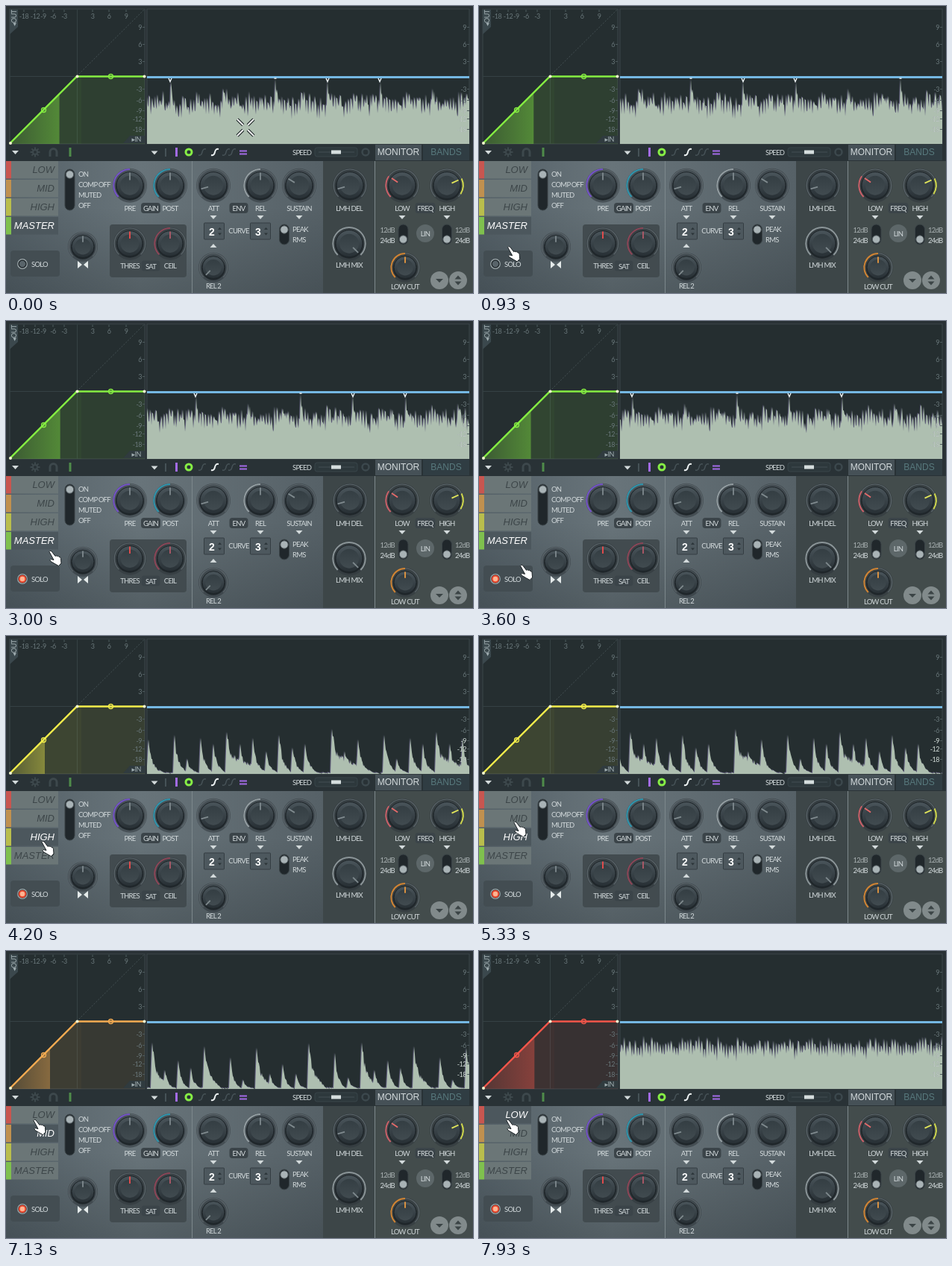
An HTML page that plays this animation: 626x385 px, repeating every 8 s.

```html
<!DOCTYPE html>
<html lang="en">
<head>
<meta charset="utf-8">
<title>Multiband compressor</title>
<style>
html, body { margin: 0; width: 100%; height: 100%; overflow: hidden; background: #293135; }
svg { display: block; width: 626px; height: 385px; }
text { font: 9.5px Lato, "Open Sans", sans-serif; letter-spacing: -.75px; fill: #d3dadc; }
.axis text { font-size: 9px; letter-spacing: -.5px; fill: #69777a; }
.tab, .band text { font: 12px "Liberation Sans", Arial, sans-serif; letter-spacing: 0; }
.band text { font-size: 13px; font-style: italic; fill: #3d4649; }
.band.on text { fill: #fff; }
.band.on .face { fill: #4c575d; }
.face { fill: #6b7677; }
.num { font: bold 14px "Liberation Sans", Arial, sans-serif; fill: #fff; }
</style>
</head>
<body>
<svg id="stage" viewBox="0 0 626 385" xmlns="http://www.w3.org/2000/svg"></svg>
<script>
const stage = document.getElementById('stage');
const $ = id => document.getElementById(id);

const rect = (x, y, w, h, fill, rx = 0, more = '') =>
  `<rect x="${x}" y="${y}" width="${w}" height="${h}" fill="${fill}" rx="${rx}" ${more}/>`;
const circle = (x, y, r, fill, more = '') => `<circle cx="${x}" cy="${y}" r="${r}" fill="${fill}" ${more}/>`;
const path = (d, stroke, width = 1, more = '') =>
  `<path d="${d}" fill="none" stroke="${stroke}" stroke-width="${width}" ${more}/>`;
const text = (x, y, s, anchor = 'middle', more = '') =>
  `<text x="${x}" y="${y}" text-anchor="${anchor}" ${more}>${s}</text>`;
const tri = (x, y, w, h, fill = '#d3dadb') => `<path d="M${x - w} ${y - h}h${2 * w}l${-w} ${2 * h}z" fill="${fill}"/>`;
const polar = (x, y, r, deg) => {
  const a = deg * Math.PI / 180;
  return `${(x + r * Math.sin(a)).toFixed(2)} ${(y - r * Math.cos(a)).toFixed(2)}`;
};
const arc = (x, y, r, from, to) =>
  `M${polar(x, y, r, from)}A${r} ${r} 0 ${to - from > 180 ? 1 : 0} 1 ${polar(x, y, r, to)}`;

// Angles are clockwise from the top.
function knob(x, y, r, angle, color, from, to, pointer = '#7f8a8e') {
  const cy = y + .7;
  return circle(x, cy, r + 5, '#30383c', 'opacity=".55"') +
    path(arc(x, cy, r + 3.7, -135, 135), '#5c666b', 1.2) +
    (color ? path(arc(x, cy, r + 3.7, from, to), color, 2) : '') +
    circle(x, cy + 1, r + 1, '#20272b') +
    circle(x, cy, r, 'url(#cap)', 'stroke="#1f262a"') +
    circle(x, cy, r * .72, 'url(#top)') +
    path(`M${polar(x, cy, r * .4, angle)}L${polar(x, cy, r * .95, angle)}`, pointer, 1.8);
}
const pill = (x, y, h, knobY) =>
  rect(x, y, 13, h, '#20272b', 6.5, 'stroke="#3a4347"') + circle(x + 6.5, knobY, 5.2, '#a9b3b6', 'stroke="#50595d"');
const tag = (x, y, w, s) => rect(x - w / 2, y - 7, w, 14, '#3b4449', 4) + text(x, y + 4, s);
const numberBox = (x, n) => rect(x, 291, 27, 22, '#4d585e', 1, 'stroke="#343d42"') +
  text(x + 10, 307.500, n, 'middle', 'class="num"') +
  tri(x + 21, 298.5, 2.5, -1.5, '#2c3539') + tri(x + 21, 306, 2.5, 1.5, '#2c3539');

const defs = `<defs>
  <linearGradient id="panel"><stop stop-color="#546067"/><stop offset=".42" stop-color="#68747a"/><stop offset="1" stop-color="#566167"/></linearGradient>
  <linearGradient id="shade" x2="0" y2="1"><stop offset=".35" stop-color="#20282c" stop-opacity="0"/><stop offset="1" stop-color="#20282c" stop-opacity=".28"/></linearGradient>
  <linearGradient id="cap" x2="0" y2="1"><stop stop-color="#4a555b"/><stop offset="1" stop-color="#272f34"/></linearGradient>
  <linearGradient id="top" x2="0" y2="1"><stop stop-color="#343e43"/><stop offset="1" stop-color="#414b50"/></linearGradient>
  <linearGradient id="glow"><stop stop-color="currentColor" stop-opacity=".12"/><stop offset="1" stop-color="currentColor" stop-opacity=".4"/></linearGradient>
  <clipPath id="under"><path d="M5 184L95 94H186V185H5z"/></clipPath>
  <clipPath id="scope"><path d="M189 5H621V185H189z"/></clipPath>
</defs>`;

const levels = [[9, 32], [6, 55], [3, 78], [-3, 115], [-6, 130], [-9, 144], [-12, 155], [-18, 169]];
const sideAxis = x => levels.map(([v, y]) =>
  text(x - 4, y, v, 'end') + path(`M${x - 3} ${y - 3.5}h3`, '#4d5a5d')).join('');
const topAxis = [[-18, 24], [-12, 39], [-9, 50], [-6, 63], [-3, 78], [3, 116], [6, 138], [9, 161]]
  .map(([v, x]) => text(x, 17, v) + path(`M${x} 5v3`, '#4d5a5d')).join('');

const curvePanel = rect(5, 4, 181, 181, '#252e30', 0, 'stroke="#3c474b"') +
  path('M95.5 5V185M5 94.5H186', '#354144') + path('M95 94L186 4', '#465255', 1, 'stroke-dasharray="2 2"') +
  `<g clip-path="url(#under)">${rect(5, 94, 181, 91, 'currentColor', 0, 'opacity=".085"')}
   ${rect(5, 94, 96, 91, 'currentColor', 0, 'opacity=".03"')}
   <rect id="level" x="5" y="94" height="91" fill="url(#glow)"/></g>
   ${path('M5 184.500L95 94.500H186', 'currentColor', 2.4)}
   ${circle(50.5, 139.5, 3, 'none', 'stroke="currentColor" stroke-width="1.3"')}
   ${circle(140.5, 94.5, 3, 'none', 'stroke="currentColor" stroke-width="1.3"')}` +
  [[6, 184], [95.5, 94.5], [185.5, 94.5]].map(([x, y]) => circle(x, y, 2, '#f1f6cf')).join('') +
  `<path d="M5 5h11v23l-11 10z" fill="#3b484d"/><path d="M157 184l9-10h20v10z" fill="#303b3f"/>
   <g class="axis">${topAxis}${sideAxis(186)}
   ${text(0, 0, '◂OUT', 'start', 'transform="translate(14 27) rotate(-90)" style="fill:#a3b0b3"')}
   ${text(181, 182, '▸IN', 'end', 'style="fill:#a3b0b3"')}</g>`;

const scopePanel = rect(189, 4, 432, 181, '#252e30', 0, 'stroke="#3c474b"') +
  `<g clip-path="url(#scope)"><path id="tint" fill="#8f82b8" opacity=".55" transform="translate(-1 -1)"/>
   <path id="wave" fill="#aebfb0"/>${rect(189, 94, 432, 3, '#74b7e2')}
   <path id="dips" fill="none" stroke="#eef4f5" stroke-width="1.4"/></g>
   <g class="axis">${sideAxis(621)}</g>
   <g class="axis" opacity=".75">${levels.slice(5).map(([v, y]) => text(617, y, v, 'end', 'style="fill:#e3eae3"')).join('')}</g>`;

const spokes = [0, 45, 90, 135].map(a => `M${polar(39, 196, 6.5, a)}L${polar(39, 196, 6.5, a + 180)}`).join('');
const wavy = (x, c, w = 1.5) => path(`M${x - 5} 200q4 1 5-4t5-4`, c, w);
const toolbar = rect(0, 186, 626, 22, '#293236') + tri(12.5, 196.5, 4.5, 2.5) +
  path(spokes, '#3d484c', 2) + circle(39, 196, 3, '#293236', 'stroke="#3d484c" stroke-width="2"') +
  path('M59 202v-6a4.5 4.5 0 0 1 9 0v6', '#3d484c', 3) + rect(84.5, 190, 3, 12, '#4f8b4a') +
  tri(199, 197, 4.5, 2.5) + rect(213, 191, 2, 11, '#465257') + rect(227, 190, 3, 12, '#a36be8') +
  circle(245, 196, 4, 'none', 'stroke="#86ee45" stroke-width="3"') + wavy(263, '#465257') +
  wavy(280, '#edf2f2', 2) + wavy(295, '#465257') + wavy(303, '#465257') +
  path('M313 194.500h10M313 198.500h10', '#a36be8', 2) +
  text(384, 200, 'SPEED', 'start', 'font-style="italic" font-weight="bold"') +
  rect(414, 190, 57, 12, '#2d383c', 3, 'stroke="#384449"') + path('M419 196h48', '#424f54') +
  rect(436, 193.500, 13, 5, '#d5dddd') + circle(482, 196, 4.5, 'none', 'stroke="#3c484d" stroke-width="2.5"') +
  rect(495, 186, 62, 21, '#465157') + rect(559, 186, 62, 21, '#303d43') +
  text(526, 200, 'MONITOR', 'middle', 'class="tab"') +
  text(590, 200, 'BANDS', 'middle', 'class="tab" style="fill:#58797d"');

const bandNames = ['LOW', 'MID', 'HIGH', 'MASTER'];
const chips = ['#c85650', '#c0904f', '#b9bd4c', '#7fc04e'];
const bands = bandNames.map((name, i) => {
  const y = 208 + 25 * i;
  return `<g class="band" id="${name}"><rect class="face" x="7" y="${y}" width="63" height="23.500"/>
    ${rect(0, y, 7, 23.500, chips[i])}${text(65, y + 16, name, 'end')}</g>`;
}).join('');

const controls = rect(0, 208, 425, 177, 'url(#panel)') + rect(0, 208, 425, 177, 'url(#shade)') +
  rect(425, 208, 69, 177, '#3d4648') + rect(495, 208, 131, 177, '#434c4c') +
  path('M249.500 208V385M494.500 208V385', '#7d888c') +
  rect(6, 328, 66, 35, '#434d52', 4) + rect(139, 293, 103, 71, '#424b4f', 4) + bands +
  pill(79, 219, 55, 226) + ['ON', 'COMP OFF', 'MUTED', 'OFF'].map((s, i) => text(97, 229 + 14 * i, s, 'start')).join('') +
  knob(166, 240, 18, 0, '#7452c8', -135, 0) + knob(220, 240, 18, 0, '#2f95ad', -135, 0) +
  knob(278, 240, 18, -106) + knob(341, 240, 18, 0, '#939da1', -135, 0) + knob(393, 240, 18, -58) +
  knob(461, 240, 18, -106) + knob(531, 240, 18, -55, '#c96068', -135, -55, '#e56a6a') +
  knob(591, 240, 18, 65, '#d0d84c', 65, 122, '#e4e85a') +
  knob(103, 322, 15, 0) + knob(166, 318, 17, 0, '', 0, 0, '#f04d4d') + knob(220, 318, 17, 0, '#8c4657', -135, 0, '#b35a69') +
  knob(460, 318, 18, 135, '#8b9598', -135, 135) + knob(278, 350, 15, -135) + knob(535, 350, 15, 0, '#cf8434', -135, 0, '#e99a40') +
  [['PRE', 166], ['POST', 220], ['ATT', 278], ['REL', 341], ['SUSTAIN', 393], ['LMH DEL', 460], ['LOW', 531], ['HIGH', 591]]
    .map(([s, x]) => text(x, 275, s)).join('') +
  tag(194, 271, 26, 'GAIN') + tag(312, 271, 25, 'ENV') + tag(562, 271, 27, 'FREQ') + tag(194, 348.500, 25, 'SAT') +
  [278, 341, 393, 531, 591].map(x => tri(x, 283.500, 4.5, 2.5)).join('') +
  text(166, 352, 'THRES') + text(220, 352, 'CEIL') + text(460, 351, 'LMH MIX') + text(278, 379, 'REL 2') + text(535, 380, 'LOW CUT') +
  '<path d="M96 342l6 5-6 5zM110 342l-6 5 6 5z" fill="#e4eaea"/>' +
  numberBox(265.500, 2) + numberBox(327.500, 3) + tri(278, 321.500, 4.5, -2.5) + text(312, 305, 'CURVE') +
  pill(366.500, 293, 27, 300) + text(384, 303, 'PEAK', 'start') + text(384, 317, 'RMS', 'start') +
  [[526, 521, 'end'], [584.500, 602, 'start']].map(([x, tx, a]) =>
    pill(x, 293, 27, 313) + text(tx, 304, '12dB', a, 'opacity=".7"') + text(tx, 318, '24dB', a)).join('') +
  circle(562, 305, 12, '#5d6769') + text(562, 309, 'LIN') +
  circle(581, 368, 12, '#818a8b') + tri(581, 368.500, 5, 2.5, '#3b4446') +
  circle(606, 368, 12, '#818a8b') + tri(606, 364, 4.5, -2.5, '#3b4446') + tri(606, 372, 4.5, 2.5, '#3b4446') +
  circle(22, 346, 6.3, '#22292d', 'stroke="#a0abae" stroke-width="1.2"') +
  circle(22, 346, 4.2, '#59646a', 'id="solo" stroke-width="2"') + text(34, 350, 'SOLO', 'start');

const darts = [45, 135, 225, 315].map(a => `M${polar(0, 0, 4.5, a)}L${polar(0, 0, 15.5, a)}`).join('');
const pointers = `<g id="cross">${path(darts, '#171f21', 4.2)}${path(darts, '#fff', 2)}</g>
  <path id="hand" fill="#fff" stroke="#1b2225" stroke-width="1" stroke-linejoin="round"
  d="M0 1.500Q1-.8 3 .8L8 7.500Q9 5.800 10.500 7.500Q12 6.300 13 8.500Q15 8 15.500 10.500L16 17L12.500 20.500L8 18L2 14.500Q0 12.500 2 11.500L6 12.500z"/>`;

stage.innerHTML = defs + rect(0, 0, 626, 385, '#293135') + curvePanel + scopePanel + toolbar + controls + pointers;

const BAR = 281, STEP = BAR / 16, SCROLL = 5.49;
const curveColors = { LOW: '#f4564a', MID: '#f4ac52', HIGH: '#f3ee4b', MASTER: '#86ef42' };
const mod = (a, n) => ((a % n) + n) % n;
const hash = n => { const s = Math.sin(n * 127.1) * 43758.5453; return s - Math.floor(s); };

// Peak height of each sixteenth note.
const hits = {
  HIGH: [56, 40, 48, 30, 52, 35, 40, 0, 60, 30, 46, 0, 52, 20, 48, 40],
  MID: [55, 20, 33, 20, 61, 0, 48, 15, 62, 25, 38, 28, 57, 0, 42, 12],
  MASTER: [87, 62, 68, 64, 84, 65, 68, 66, 83, 60, 70, 58, 74, 60, 70, 62]
};
// Share of the peak that rings on, and for how many pixels.
const tails = {
  HIGH: { heavy: [.45, 60], light: [.35, 18] },
  MID: { heavy: [.42, 24], light: [.25, 15] },
  MASTER: { heavy: [.3, 20], light: [.2, 14] }
};

function drums(band, i) {
  const p = mod(i, BAR);
  let height = 2 * hash(i);
  hits[band].forEach((h, k) => {
    const d = mod(p - Math.round(k * STEP) + 1, BAR);
    const heavy = k % 4 === 0 && !(band === 'HIGH' && k % 8 === 4);
    const [tail, length] = tails[band][heavy ? 'heavy' : 'light'];
    const since = Math.max(0, d - 1);
    const fall = (1 - tail) * Math.exp(-since / 3) + tail * Math.max(0, 1 - since / length);
    const grain = d > 2 ? .78 + .4 * hash(i + 9) : 1;
    height = Math.max(height, h * (d === 0 ? .55 : fall * grain));
  });
  return 185 - Math.min(height, 87);
}
function rumble(i) {
  const u = i * .27, n = Math.floor(u), saw = Math.abs(2 * (u - n) - 1);
  return 113 + 11 * hash(n) + (13 + 14 * hash(n + 50)) * saw + 3 * hash(i);
}
function waveTop(band, i) {
  if (band === 'LOW') return rumble(i);
  if (band !== 'MASTER') return drums(band, i);
  const swell = 13 * Math.exp(-mod(mod(i, BAR), 2 * STEP) / 9);
  const grit = 12 * (hash(i * 3) - .4);
  return Math.max(98, Math.min(rumble(i) + 4 + grit - swell, drums(band, i)));
}

const moves = [[0, 321, 163], [13, 40, 320], [19, 22, 352], [40, 22, 352], [45, 58, 308], [49, 58, 308],
  [53, 56, 330], [60, 48, 275], [67, 48, 275], [76, 47, 249], [102, 47, 249], [107, 37, 226], [120, 37, 226]];
function cursorAt(frame) {
  const k = moves.findIndex(m => m[0] > frame);
  const [a, b] = [moves[k - 1], moves[k]];
  const u = (frame - a[0]) / (b[0] - a[0]), e = u * u * (3 - 2 * u);
  return [a[1] + (b[1] - a[1]) * e, a[2] + (b[2] - a[2]) * e];
}

let shown = -1;
function draw(frame) {
  const band = frame < 61 ? 'MASTER' : frame < 82 ? 'HIGH' : frame < 109 ? 'MID' : 'LOW';
  const offset = Math.round(frame * SCROLL) - 361;
  let d = 'M188 185';
  for (let x = 188; x <= 622; x++) d += `L${x} ${waveTop(band, x + offset).toFixed(1)}`;
  d += 'V185z';
  $('wave').setAttribute('d', d);
  $('tint').setAttribute('d', d);

  let dips = '';
  if (band === 'MASTER') {
    for (let x = -offset - 2 * BAR; x < 640; x += BAR) {
      dips += `M${x - 1.5} 97h3M${x + 68} 97l2 4.500 2-4.500M${x + 138} 97l2 4.500 2-4.500`;
    }
  }
  $('dips').setAttribute('d', dips);

  let peak = 185;
  for (let x = 612; x <= 621; x++) peak = Math.min(peak, waveTop(band, x + offset));
  $('level').setAttribute('width', Math.max(0, 184 - peak));
  stage.setAttribute('color', curveColors[band]);
  bandNames.forEach(name => $(name).classList.toggle('on', name === band));
  $('solo').setAttribute('fill', frame < 31 ? '#59646a' : '#ffb391');
  $('solo').setAttribute('stroke', frame < 31 ? 'none' : '#e9482f');

  const [x, y] = cursorAt(frame);
  const inScope = y < 185;
  $('cross').setAttribute('transform', `translate(${x} ${y})`);
  $('hand').setAttribute('transform', `translate(${x} ${y})`);
  $('cross').setAttribute('visibility', inScope ? 'visible' : 'hidden');
  $('hand').setAttribute('visibility', inScope ? 'hidden' : 'visible');
}
function tick() {
  const frame = Math.floor((performance.now() % 8000) * .015 + .1) % 120;
  if (frame !== shown) draw(shown = frame);
  requestAnimationFrame(tick);
}
tick();
</script>
</body>
</html>
```
